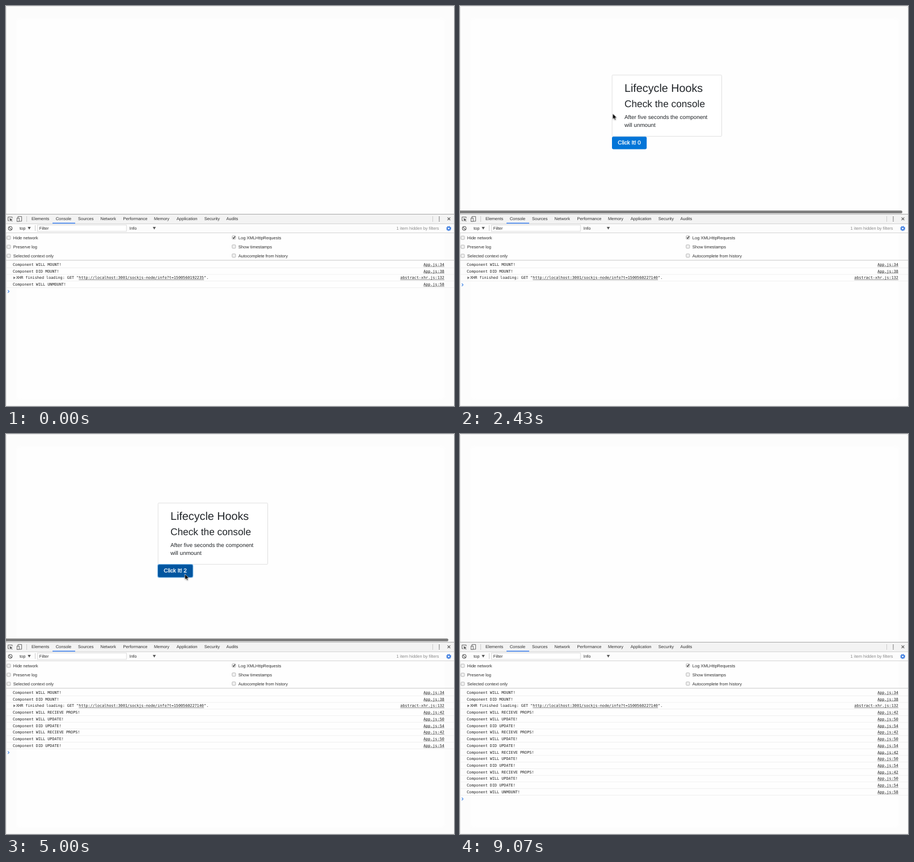
Write an HTML page that moves like this. It is 790x708 px and loops after 9.16 s.

```html
<!DOCTYPE html>
<html lang="en">
<head>
<meta charset="utf-8">
<title>Lifecycle hooks in the console</title>
<style>
  html, body { margin: 0; width: 100%; height: 100%; overflow: hidden; background: #fcfcfc; }
  svg { display: block; width: 790px; height: 708px; text-rendering: geometricPrecision; }
  text { font-family: "Liberation Sans", Arial, sans-serif; white-space: pre; }
  .ui { font-size: 7.5px; fill: #303030; }
  .page { font-size: 9.87px; fill: #212529; }
  .log text { font: 6.79px "DejaVu Sans Mono", monospace; fill: #222; }
  .rule { stroke-width: 1; fill: none; }
  .box { fill: #f1f1f1; stroke: #a8a8a8; stroke-width: .8; }

  #app, #btn, #ring, #cursor { animation: 9160ms linear infinite; }
  #app { animation-name: app; animation-timing-function: step-end; }
  #btn { animation-name: hover; }
  #ring { animation-name: focus; }
  #cursor { animation-name: move; }

  /* mounted from 2070 ms to 6900 ms */
  @keyframes app {
    0% { visibility: hidden; }
    22.598% { visibility: visible; }
    75.328%, 100% { visibility: hidden; }
  }
  @keyframes hover {
    0%, 29.476% { fill: #0275d8; animation-timing-function: ease-in-out; }
    31.659%, 100% { fill: #0256a0; }
  }
  @keyframes focus {
    0%, 36.026% { opacity: 0; animation-timing-function: ease-in-out; }
    38.21%, 100% { opacity: 1; }
  }
  @keyframes move {
    0%, 21.069% { visibility: hidden; transform: translate(114px, -9px); }
    21.07% { visibility: visible; transform: translate(114px, -9px); }
    21.834% { transform: translate(129px, 17px); animation-timing-function: cubic-bezier(.4, .1, .4, 1); }
    30.349%, 31.332% { transform: translate(316.3px, 248.6px); }
    34.17%, 87.335% { visibility: visible; transform: translate(315.4px, 247.8px); }
    87.336%, 100% { visibility: hidden; transform: translate(315.4px, 247.8px); }
  }
</style>
</head>
<body>
<svg viewBox="0 0 790 708" xmlns="http://www.w3.org/2000/svg">
  <defs>
    <filter id="soft" x="-5%" y="-5%" width="110%" height="110%"><feGaussianBlur stdDeviation="2"/></filter>
    <filter id="shade" x="-50%" y="-50%" width="200%" height="200%"><feGaussianBlur stdDeviation=".9"/></filter>
  </defs>

  <rect width="790" height="708" fill="#fcfcfc"/>
  <rect x="18" y="22" width="756" height="674" rx="6" fill="#fefefe" filter="url(#soft)"/>
  <path class="rule" d="M.5 708V3Q.5 .5 3 .5H787Q789.5 .5 789.5 3" stroke="#e6e6e6"/>
  <path class="rule" d="M0 707.5H790" stroke="#f1f1f1"/>

  <g id="app">
    <rect x="268.2" y="122.2" width="193.3" height="108.5" rx="1.5" fill="#fff" stroke="#dcdcdc" stroke-width=".9"/>
    <text class="page" x="290" y="152" style="font-size:19.74px">Lifecycle Hooks</text>
    <text class="page" x="290" y="178.6" style="font-size:17.27px">Check the console</text>
    <text class="page" x="290" y="199.5">After five seconds the component</text>
    <text class="page" x="290" y="214.2">will unmount</text>
    <rect id="ring" x="266.9" y="230" width="63.4" height="24.6" rx="3.4" fill="#80baeb"/>
    <rect id="btn" x="268" y="231.2" width="61.2" height="22.2" rx="2.4"/>
    <text id="label" x="278.3" y="245.4" font-size="9.87" fill="#fff" stroke="#fff" stroke-width=".35">Click It! 0</text>
    <path d="M0 362H777.5A2.5 2.5 0 0 1 777.5 367H0Z" fill="#7f7f7f"/>
  </g>

  <g id="tools">
    <rect y="368" width="790" height="17.5" fill="#f3f3f3"/>
    <rect y="386" width="790" height="16" fill="#fcfcfc"/>
    <path class="rule" d="M0 368.5H790" stroke="#a8a8a8"/>
    <path class="rule" d="M0 385.5H790M0 401.5H790" stroke="#d4d4d4"/>
    <path class="rule" d="M0 450H790" stroke="#c8c8c8"/>
    <path class="rule" d="M36.5 372V382M51.5 388V398M752.5 372V382" stroke="#ccc"/>
    <rect x="82" y="383.6" width="40" height="1.6" fill="#4285f4"/>

    <g fill="none" stroke="#5a5a5a" stroke-width=".9">
      <path d="M6 380H3.6V373.5H11V375.5"/>
      <path d="M6.2 375.5L11.6 378L9.3 378.7L11.4 381L10.6 381.6L8.7 379.4L7.6 381.4Z" fill="#5a5a5a" stroke="none"/>
      <path d="M21 375V372.6H27.6V381H23.5"/>
      <rect x="19.4" y="375.4" width="3.8" height="6"/>
      <path d="M778.6 374.3L783.4 379.1M783.4 374.3L778.6 379.1" stroke-width="1.2"/>
      <circle cx="7.5" cy="393.6" r="3.3" stroke-width="1.1"/>
      <path d="M5.2 391.3L9.8 395.9" stroke-width="1.1"/>
    </g>
    <g fill="#5a5a5a">
      <circle cx="764" cy="373.7" r=".9"/><circle cx="764" cy="377" r=".9"/><circle cx="764" cy="380.3" r=".9"/>
      <path d="M38.3 391H43.7L41 395.8ZM258.8 391H264.2L261.5 395.8Z"/>
    </g>
    <circle cx="780.7" cy="393.8" r="2.5" fill="none" stroke="#3f7ee0" stroke-width="2"/>
    <circle cx="780.7" cy="393.8" r="3.9" fill="none" stroke="#3f7ee0" stroke-width="1.2" stroke-dasharray="1.53"/>
    <rect x="55.5" y="387.7" width="156.8" height="11.2" fill="#fff" stroke="#d8d8d8" stroke-width=".9"/>
  </g>

  <g class="log" id="log"></g>
  <path id="prompt" d="M3.2 -2.3L5.5 0L3.2 2.3" fill="none" stroke="#3b82e8" stroke-width="1.1"/>

  <g id="cursor">
    <path d="M0 0V10L2.3 7.9L3.8 11.3L5.5 10.6L4.1 7.3H7.2Z" transform="translate(.3 1)" opacity=".35" filter="url(#shade)"/>
    <path d="M0 0V10L2.3 7.9L3.8 11.3L5.5 10.6L4.1 7.3H7.2Z" fill="#000" stroke="#fff" stroke-width=".7"/>
  </g>
</svg>
<script>
  const $ = id => document.getElementById(id);
  const ROW = 11.73, CHAR = 6.79 * .602;
  const CLEAR = 1300, MOUNT = 2070, XHR = 2270, UNMOUNT = 6900;
  const CLICKS = [3400, 4100, 5070, 5800];

  function add(parent, tag, attrs, text = '') {
    const el = document.createElementNS('http://www.w3.org/2000/svg', tag);
    for (const key in attrs) el.setAttribute(key, attrs[key]);
    el.textContent = text;
    parent.append(el);
    return el;
  }

  const label = (x, y, text, more) => add($('tools'), 'text', { class: 'ui', x, y, ...more }, text);

  [['Elements', 45], ['Console', 87.7], ['Sources', 127], ['Network', 166.5], ['Performance', 206.5],
   ['Memory', 261], ['Application', 300.8], ['Security', 349.8], ['Audits', 388.5]]
    .forEach(([name, x]) => label(x, 379.4, name));
  label(24, 396, 'top');
  label(58.8, 396, 'Filter');
  label(217.8, 396, 'Info');
  label(763.6, 396, '1 item hidden by filters', { 'text-anchor': 'end', style: 'fill:#8a8a8a' });

  function option(x, y, text) {
    add($('tools'), 'rect', { class: 'box', x: x - 3, y: y - 3, width: 6, height: 6, rx: 1 });
    label(x + 8, y + 2.9, text);
  }
  ['Hide network', 'Preserve log', 'Selected context only'].forEach((s, i) => option(4.8, 410.2 + 16 * i, s));
  ['Log XMLHttpRequests', 'Show timestamps', 'Autocomplete from history'].forEach((s, i) => option(401.8, 409.8 + 16 * i, s));
  add($('tools'), 'path', { d: 'M400.2 409.8L401.5 411.5L404 407.6', fill: 'none', stroke: '#333', 'stroke-width': 1.2 });

  function underlined(g, x, y, text) {
    add(g, 'text', { x, y }, text);
    add(g, 'path', { d: `M${x} ${y + 1.1}h${text.length * CHAR}`, stroke: '#444', 'stroke-width': .6 });
  }

  // One console row; `stamp` marks the network request row.
  function makeRow(i, { text, link, stamp }) {
    const g = add($('log'), 'g', {});
    const y = 460 + i * ROW;
    if (stamp) {
      const head = 'XHR finished loading: GET "', url = 'http://localhost:3001/sockjs-node/info?t=' + stamp;
      const x = 18 + head.length * CHAR;
      add(g, 'path', { d: `M13.2 ${y - 4.8}v4.8l3.6 -2.4z`, fill: '#6e6e6e' });
      add(g, 'text', { x: 18, y }, head);
      underlined(g, x, y, url);
      add(g, 'text', { x: x + url.length * CHAR, y }, '".');
    } else {
      add(g, 'text', { x: 12, y }, `Component ${text}!`);
    }
    underlined(g, 773 - link.length * CHAR, y, link);
    add(g, 'path', { d: `M0 ${y + 3.4}H790`, stroke: '#ececec', 'stroke-width': .8 });
    return g;
  }

  const hook = (text, line, from, to) => ({ text, link: 'App.js:' + line, from, to });
  const mount = (stamp, from, loaded, to) => [
    hook('WILL MOUNT', 34, from, to),
    hook('DID MOUNT', 38, from, to),
    { stamp, link: 'abstract-xhr.js:132', from: loaded, to }
  ];
  const update = at => [
    hook('WILL RECIEVE PROPS', 42, at, 9160),
    hook('WILL UPDATE', 50, at, 9160),
    hook('DID UPDATE', 54, at, 9160)
  ];
  const before = [...mount('1500560192235', 0, 0, CLEAR), hook('WILL UNMOUNT', 58, 0, CLEAR)];
  const after = [...mount('1500560227140', MOUNT, XHR, 9160), ...CLICKS.flatMap(update), hook('WILL UNMOUNT', 58, UNMOUNT, 9160)];
  const rows = [before, after].flatMap(list => list.map((row, i) => ({ ...row, el: makeRow(i, row) })));

  const clock = $('cursor').getAnimations()[0];

  function draw() {
    const t = (clock.currentTime || 0) % 9160;
    let shown = 0;
    for (const { from, to, el } of rows) {
      const on = t >= from && t < to;
      el.style.display = on ? '' : 'none';
      shown += on;
    }
    $('prompt').setAttribute('transform', `translate(0 ${458.3 + shown * ROW})`);
    $('label').textContent = 'Click It! ' + CLICKS.filter(at => t >= at).length;
    requestAnimationFrame(draw);
  }
  draw();
</script>
</body>
</html>
```
